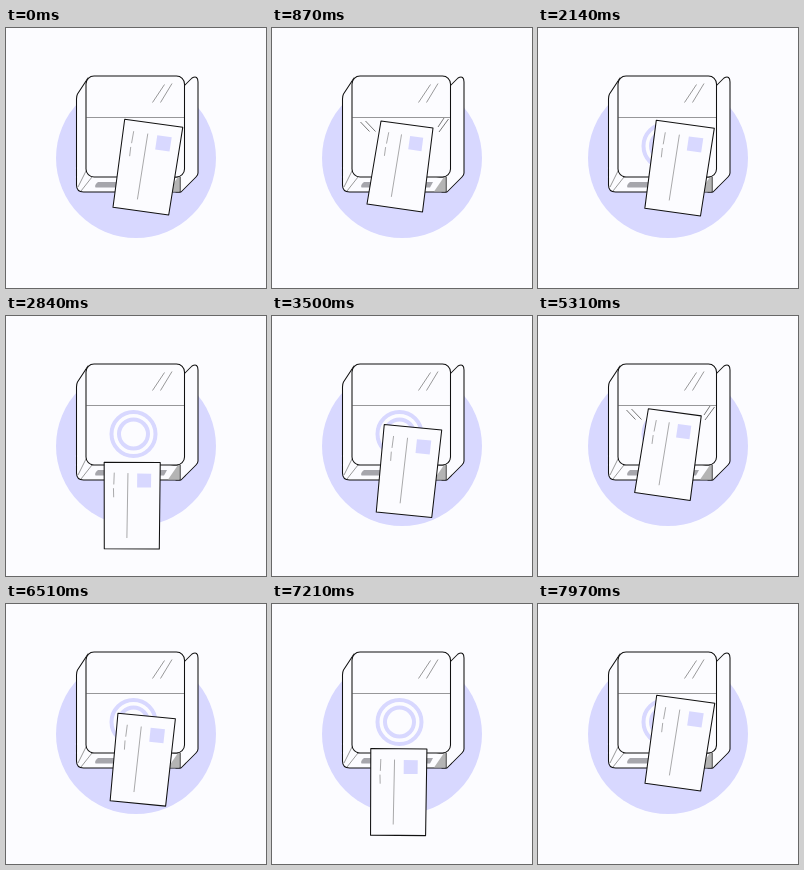
Animation of 260x260 px, one loop 8000 ms. Source, as an HTML page:

```html
<!DOCTYPE html>
<html lang="en">
<head>
<meta charset="utf-8">
<title>Card and reader</title>
<style>
  html, body { margin: 0; width: 100%; height: 100%; overflow: hidden; background: #fcfcff; }
  svg { display: block; width: 100vw; height: 100vh; }
  .ink { fill: #fcfcff; stroke: #111; stroke-width: 1.05; stroke-linejoin: round; }
  .thin { fill: none; stroke: #555; stroke-width: .6; }
  .tint { fill: #d8d8ff; }
  #rings { fill: none; stroke: #d8d8ff; stroke-width: 4; }
  #marks { fill: none; stroke: #777; stroke-width: 1; }
  #lines { stroke-width: .5; }
</style>
</head>
<body>
<svg viewBox="0 0 260 260">
  <circle class="tint" cx="130" cy="130" r="80"/>
  <path class="ink" d="M178 58 L186 50 Q192 47 192 54 V145 Q192 147 190 149 L175 164 H170 V58Z"/>
  <path class="ink" d="M82 50 L71.5 66 Q70.5 68 70.5 71 V157 Q70.5 164 77.5 164 H174 V149 H168 L100 140Z"/>
  <path d="M172 149 H174 V163.5 H162Z" fill="#b4b4b4"/>
  <path class="thin" d="M80.5 142 L72 159 M86 149 L75 163 M174 149 V164"/>
  <path d="M92 154 H161 L158 159.5 H89.5 Q88 157 92 154Z" fill="#a6a6ac"/>
  <rect class="ink" x="80" y="48" width="98.5" height="101" rx="8"/>
  <path class="thin" d="M80 89.5 H178 M146.5 74.5 L158.5 56.5 M154.5 74.5 L166 55.5"/>
  <g id="rings"><circle cx="127.5" cy="118" r="22"/><circle cx="127.5" cy="118" r="14.5"/></g>
  <path id="marks" d="M88.5 94 L97.5 103.5 M93.5 93 L103.5 103.5 M166 99 L172 90 M167 104 L176.5 91"/>
  <path id="card" class="ink"/>
  <path id="lines" class="thin"/>
  <path id="stamp" class="tint"/>
</svg>
<script>
const LOOP = 8000, CYCLE = 4100;
const byId = id => document.getElementById(id);

// Card corners: top left, top right, bottom right, bottom left
const rest = [[118.7, 91.2], [176.8, 99.2], [162.7, 187], [107, 179.2]];
const tapped = [[109, 93], [161, 100], [150.5, 184], [95, 176]];
const lowered = [[97.5, 148], [153.5, 148], [153, 234.5], [98, 234.5]];

const steps = [
  [0, rest], [350, rest], [850, tapped], [1070, tapped], [1600, rest],
  [2050, rest], [2955, lowered], [3850, rest], [CYCLE, rest]
];

const mix = (a, b, k) => a + (b - a) * k;
const mixPoint = (a, b, k) => [mix(a[0], b[0], k), mix(a[1], b[1], k)];
const ease = k => k < .5 ? 2 * k * k : 1 - 2 * (1 - k) * (1 - k);
const ramp = (t, from, to) => Math.min(1, Math.max(0, (t - from) / (to - from)));

function poseAt(t) {
  const i = steps.findIndex(([end]) => t < end);
  const [start, from] = steps[i - 1], [end, to] = steps[i];
  const k = ease((t - start) / (end - start));
  return from.map((p, n) => mixPoint(p, to[n], k));
}

function draw(time) {
  const t = (time % LOOP) % CYCLE;
  const [tl, tr, br, bl] = poseAt(t);
  const at = (u, v) => mixPoint(mixPoint(tl, tr, u), mixPoint(bl, br, u), v)
    .map(n => n.toFixed(2)).join(' ');
  const line = (u, v, u2, v2) => `M${at(u, v)}L${at(u2, v2)}`;
  const box = (u, v, u2, v2) => `M${at(u, v)}L${at(u2, v)}L${at(u2, v2)}L${at(u, v2)}Z`;

  byId('card').setAttribute('d', box(0, 0, 1, 1));
  byId('stamp').setAttribute('d', box(.59, .13, .84, .29));
  byId('lines').setAttribute('d', line(.425, .125, .41, .875)
    + line(.18, .12, .172, .257) + line(.166, .3, .17, .405));
  byId('marks').style.opacity = ramp(t, 740, 820) - ramp(t, 1300, 1400);
  byId('rings').style.opacity = ramp(t, 1000, 1200) - ramp(t, 3920, 4080);
}

const begin = performance.now();
function frame() {
  draw(performance.now() - begin);
  requestAnimationFrame(frame);
}
frame();
</script>
</body>
</html>
```
